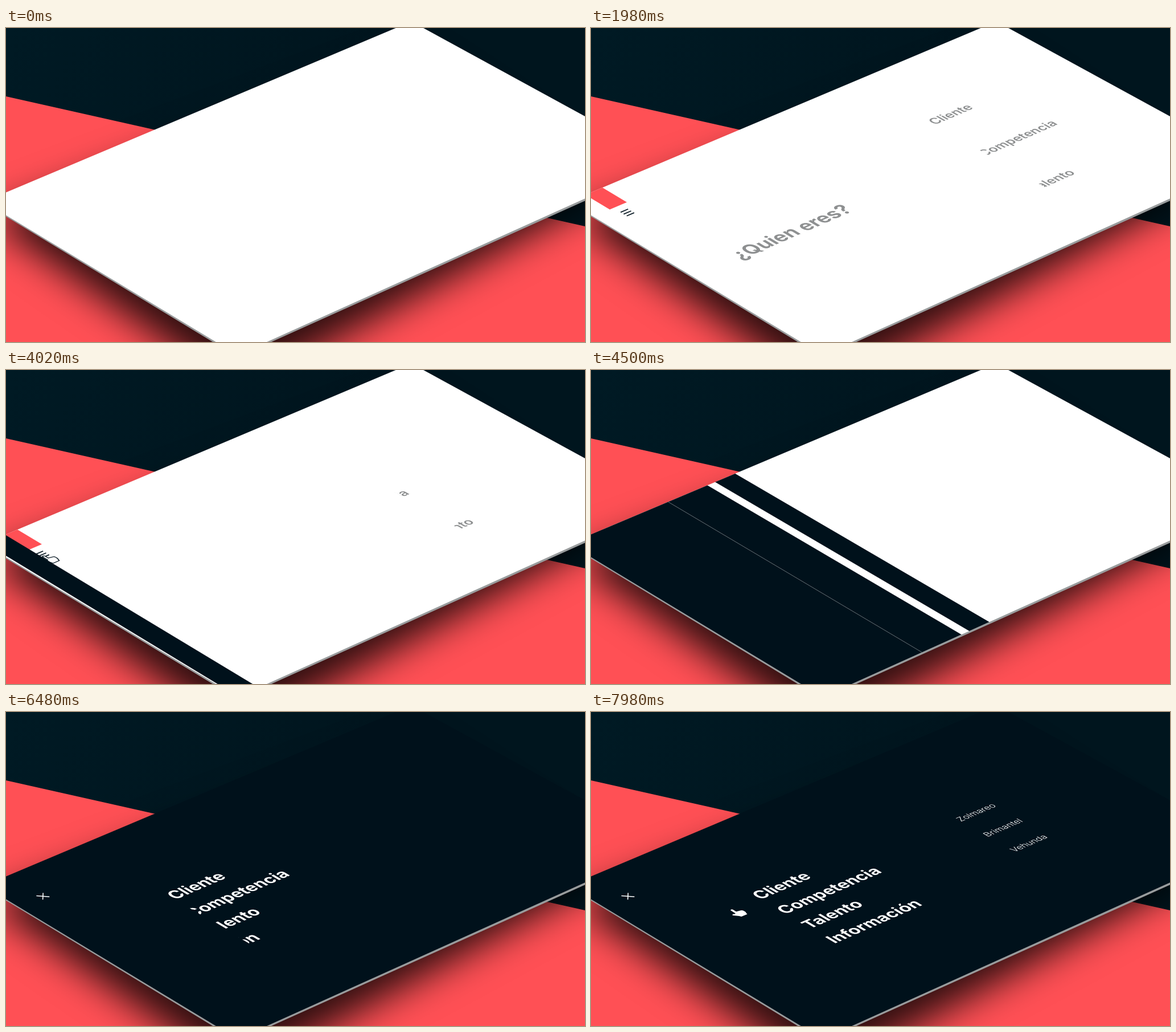
Recreate the animation shown at these times as an HTML page with a canvas. Size 1017x551 px, loop 8 s.

```html
<!DOCTYPE html>
<html lang="es">
<head>
<meta charset="utf-8">
<title>Menu</title>
<style>
  html, body { margin: 0; width: 100%; height: 100%; overflow: hidden; background: #001720; }
  canvas { display: block; }
</style>
</head>
<body>
<canvas id="stage" width="1017" height="551"></canvas>
<script>
const LOOP = 8000, W = 1017, H = 551;
const PAGE_W = 1600, PAGE_H = 1000;
const INK = '#00111b', RED = '#ff5055', GREY = '#8e9091';
const ctx = document.getElementById('stage').getContext('2d');

// Page units to stage pixels; the page is a slightly tapered tilted sheet.
function project(x, y) {
  const u = x / PAGE_W, v = y / PAGE_H;
  return [-39 + 751 * u + 446 * v + 4 * u * v, 305 - 316 * u + 270 * v - 23 * u * v];
}

// Local page axes at a point.
function enter(c, x, y) {
  const u = x / PAGE_W, v = y / PAGE_H, [px, py] = project(x, y);
  c.setTransform((751 + 4 * v) / PAGE_W, (-316 - 23 * v) / PAGE_W,
                 (446 + 4 * u) / PAGE_H, (270 - 23 * u) / PAGE_H, px, py);
}

function poly(c, pts) {
  c.beginPath();
  pts.forEach(p => c.lineTo(p[0], p[1]));
  c.closePath();
}

function rect(x0, y0, x1, y1, color) {
  poly(ctx, [project(x0, y0), project(x1, y0), project(x1, y1), project(x0, y1)]);
  ctx.fillStyle = color;
  ctx.fill();
}

function line(a, b, width, color) {
  ctx.beginPath();
  ctx.moveTo(...a);
  ctx.lineTo(...b);
  ctx.lineWidth = width;
  ctx.strokeStyle = color;
  ctx.stroke();
}

const clamp = k => Math.min(1, Math.max(0, k));
const easeOut = k => 1 - (1 - k) ** 3;
const rise = (t, start, dur = 800) => easeOut(clamp((t - start) / dur));

function track(keys, t) {
  for (let i = 1; i < keys.length; i++) {
    const [t0, a] = keys[i - 1], [t1, b] = keys[i];
    if (t <= t1) return a + (b - a) * clamp((t - t0) / (t1 - t0));
  }
  return keys[keys.length - 1][1];
}

// Text slides right from behind a mask at its own left edge.
function slideText({ s, x, y, size, weight = 700, color }, p) {
  if (p <= 0) return;
  ctx.save();
  enter(ctx, x, y);
  ctx.beginPath();
  ctx.rect(0, -size * 1.1, 1200, size * 1.5);
  ctx.clip();
  ctx.font = `${weight} ${size}px Inter, "Noto Sans", sans-serif`;
  ctx.fillStyle = color;
  ctx.fillText(s, (p - 1) * ctx.measureText(s).width, 0);
  ctx.restore();
}

const option = (s, y, at) => ({ s, x: 1078, y, size: 43, weight: 600, color: GREY, at });
const entry = (s, i) => ({ s, x: 368, y: 367 + 97 * i, size: 56, color: '#fff', at: 5796 + 216 * i });
const social = (s, i) => ({ s, x: 1085, y: 400 + 105 * i, size: 30.5, weight: 300, color: '#fff', at: 6600 + 150 * i });

const intro = [
  { s: '¿Quien eres?', x: 165, y: 503, size: 66, color: GREY, at: 1056 },
  option('Cliente', 306, 1330),
  option('Competencia', 513, 1485),
  option('Talento', 736, 1690)
];
const menu = [
  ...['Cliente', 'Competencia', 'Talento', 'Información'].map(entry),
  ...['Zolmareo', 'Brimantel', 'Vehunda'].map(social)
];

const FRONT = [[3950, 0], [4500, 622], [4950, 1158], [5250, 1502], [5490, 1852]];
const SHEET = [[-39, 305], [712, -11.5], [1162, 234], [407, 574]];
const EDGE = [[-39, 307], [712, 40], [1162, 238], [407, 577.5]];
const SHADOW = [[-30, 335], [712, 55], [1062, 285], [407, 638]];
const HAND = new Path2D('M-4 20V2a4 4 0 0 1 8 0V14l14 3q5 1 5 6v6q0 4-3 8l-1 5H-3l-3-6-10-12q-2-4 2-5t5 2z');

const backdrop = document.createElement('canvas');
backdrop.width = W;
backdrop.height = H;
(function paintBackdrop(c) {
  const g = c.createLinearGradient(0, 0, 500, 300);
  g.addColorStop(0, '#001a24');
  g.addColorStop(1, '#00151e');
  c.fillStyle = g;
  c.fillRect(0, 0, W, H);
  poly(c, [[0, 120], [W, 348], [W, H], [0, H]]);
  c.fillStyle = RED;
  c.fill();
  c.filter = 'blur(33px)';
  poly(c, SHADOW);
  c.fillStyle = 'rgba(0,0,0,.82)';
  c.fill();
  c.filter = 'none';
  poly(c, EDGE);
  c.fillStyle = '#999c9d';
  c.fill();
})(backdrop.getContext('2d'));

function hand(t, start, outlined) {
  if (t < start) return;
  const p = rise(t, start, 740);
  ctx.save();
  ctx.transform(.469, -.203, .446, .268, 772 - 706 * p, 406 - 79 * p);
  ctx.fillStyle = '#fff';
  ctx.fill(HAND);
  if (outlined) {
    ctx.lineWidth = 3.2;
    ctx.lineJoin = 'round';
    ctx.strokeStyle = '#10202a';
    ctx.stroke(HAND);
  }
  ctx.restore();
}

function burger(t) {
  for (let i = 0; i < 3; i++) {
    const p = rise(t, 600 + 80 * i), y = 124 + 12 * i;
    if (p > 0) line(project(76, y), project(76 + 28 * p, y), 1.8, '#10202a');
  }
}

function cross(t) {
  const r = 12.5 * rise(t, 5670, 600);
  if (r <= 0) return;
  for (const d of [1, -1])
    line(project(92 - r, 136 - d * r), project(92 + r, 136 + d * r), 1.6, '#fff');
}

function sweep(t) {
  const x = track(FRONT, t);
  if (x <= 0) return;
  const k = clamp((t - 4500) / 750);
  const band = (a, b) => rect(a, -20, b, PAGE_H + 20, INK);
  band(x - 75 + 7 * k, x);
  band(-60, x - 104 + 5 * k);
  const seam = x - 251 + 9 * k;
  if (seam > 0 && seam < PAGE_W) line(project(seam, 0), project(seam, PAGE_H), .8, '#7f888c');
}

function draw(t) {
  const dark = t >= 5490;
  ctx.setTransform(1, 0, 0, 1, 0, 0);
  ctx.drawImage(backdrop, 0, 0);
  ctx.save();
  poly(ctx, SHEET);
  ctx.fillStyle = dark ? INK : '#fff';
  ctx.fill();
  ctx.clip();

  if (dark) {
    cross(t);
    menu.forEach(item => slideText(item, rise(t, item.at)));
    hand(t, 7711, false);
  } else {
    const drop = 96 * (rise(t, 120) - 1);
    if (t > 120) rect(62, drop - 4, 126, drop + 96, RED);
    burger(t);
    intro.forEach((item, i) => {
      const out = clamp((t - 3360 - 60 * i) / 560) ** 3;
      slideText(item, rise(t, item.at, 780) * (1 - out));
    });
    hand(t, 2400, true);
    sweep(t);
  }
  ctx.restore();
}

function tick() {
  draw(performance.now() % LOOP);
  requestAnimationFrame(tick);
}
tick();
</script>
</body>
</html>
```
